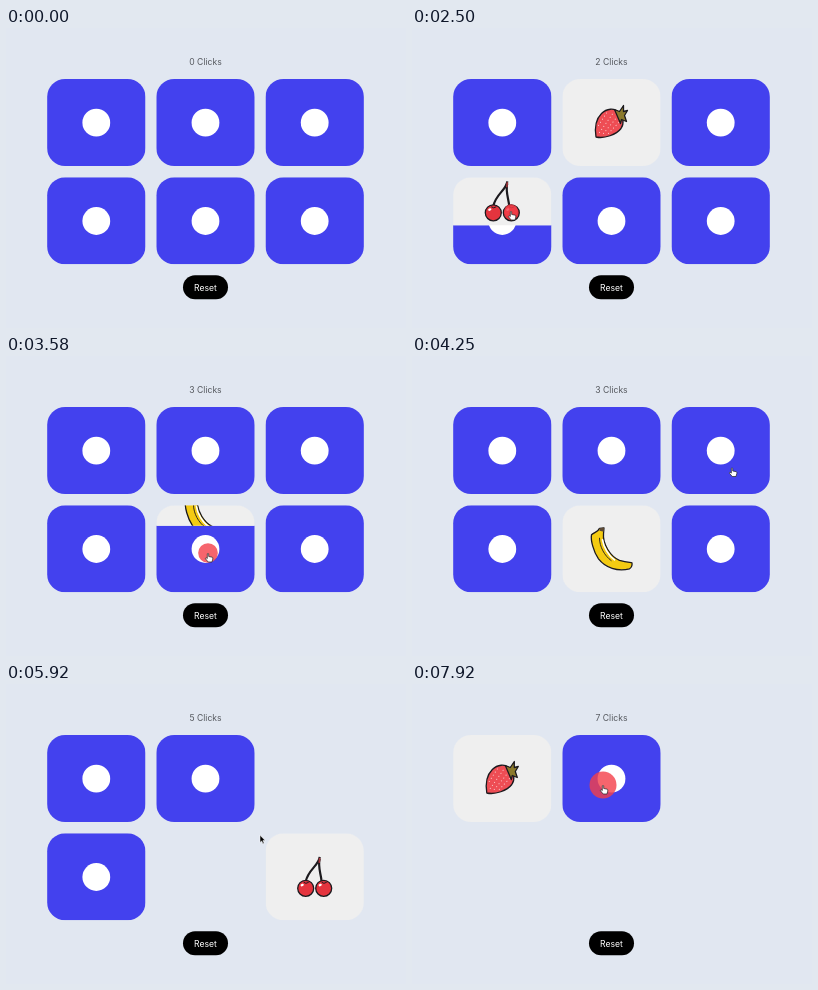
An HTML page that plays this animation: 400 by 300 pixels, repeating every 8 s.

```html
<!DOCTYPE html>
<html lang="en">
<head>
<meta charset="utf-8">
<title>Memory game</title>
<style>
  html, body { margin: 0; width: 100%; height: 100%; overflow: hidden; background: #e1e7f1; }
  #stage { display: block; width: 400px; height: 300px; }
  text { font: 8.6px Inter, "Liberation Sans", sans-serif; text-anchor: middle; }
  .line { stroke: #1c1a1e; stroke-width: 1.3; stroke-linejoin: round; }
  .ink { fill: none; stroke: #1c1a1e; }
  .shine { fill: none; stroke: #fff; stroke-linecap: round; }
</style>
</head>
<body>
<svg id="stage" viewBox="0 0 400 300">
  <defs>
    <g id="strawberry">
      <path class="line" fill="#ee4d54" d="M-15.5 14.5C-17 5-15-4-10-9C-5-14 3-15 7-10C12-6 13 1 9.5 6C5 12-7 16.5-15.5 14.5Z"/>
      <path class="shine" stroke-width="1.1" stroke-opacity=".65" stroke-dasharray=".1 3.6" d="M-12 10L2-10M-8 11L6-6M-3 11L9-2M-13 3L-4-11"/>
      <path class="line" fill="#8b7a2c" d="M3-13L8-11L12-17L12-11L16-12L13-7L15-1L10-3L9 1L6-6Z"/>
    </g>
    <g id="banana">
      <path class="line" fill="#f4cb12" d="M-12-20.5L-7.5-21L-8-15C-9-5-1 8 8 11.5C13 13 17 13.5 20.5 14Q21 18 18 20C6 23-6 19-13 10C-18 3-21-9-20-14C-17-17-13.5-16.5-12-20.5Z"/>
      <path class="shine" stroke-width="1.6" d="M-9-9C-8-2-3 7 3 11"/>
      <path class="ink" stroke-width=".9" d="M-12-11C-12-2-7 7 0 12"/>
      <path fill="#5d4a35" d="M-12-20.5L-7.5-21L-7.8-17L-12-18Z"/>
    </g>
    <g id="cherry">
      <path class="ink" stroke-width="2.2" d="M5-20C4-11-7-7-9 5M5-18C3-10 6-4 7 5"/>
      <path stroke="#a5343a" stroke-width="1.6" d="M5-19L4.5-14"/>
      <g id="berry">
        <circle class="line" cx="-9" cy="11.5" r="8" fill="#e4343e"/>
        <path class="shine" stroke-width="2.2" d="M-13 8.5L-12 8"/>
        <path class="ink" d="M-11 5.5Q-9 7.5-6 5.5"/>
      </g>
      <use href="#berry" x="18"/>
    </g>
    <clipPath id="round"><rect width="98.4" height="87" rx="18"/></clipPath>
  </defs>
  <text id="count" x="199.5" y="37" fill="#55585e"></text>
  <g id="cards"></g>
  <rect x="177" y="247.2" width="45" height="24" rx="12"/>
  <text x="199.5" y="262.5" fill="#fff">Reset</text>
  <circle id="pulse" fill="#f43f48" fill-opacity=".8"/>
  <g id="cursor" stroke-linejoin="round">
    <path id="arrow" stroke="#fff" stroke-width=".5" d="M0 0V7.2L1.7 5.7L2.9 8.4L4.1 7.9L2.9 5.2H5.1Z"/>
    <path id="hand" fill="#fff" stroke="#222" stroke-width=".7" d="M-.7.8Q0-.4.7.8V3.5L4.3 4.2Q5 4.5 4.8 6L4 9H.2L-2.6 5.7Q-2.6 4.5-1.4 5L-.7 5.6Z"/>
  </g>
</svg>
<script>
const LOOP = 8000, STEP = 1000 / 12, W = 98.4, H = 87;
const ENTER = 1160, TRAVEL = 400, HOLD = 120, RELEASE = 160, FLIP = 250, PEEK = 500;
const $ = id => document.getElementById(id);
const clamp = v => Math.min(1, Math.max(0, v));
const smooth = v => v * v * (3 - 2 * v);
const show = (el, on) => el.setAttribute('visibility', on ? 'visible' : 'hidden');

// leave: cursor sets off; up: button released; bow: bend of the way there
const clicks = [
  { card: 1, leave: ENTER, up: 1691, x: 215, y: 52 },
  { card: 3, leave: 1830, up: 2420, x: 99, y: 183 },
  { card: 4, leave: 3030, up: 3540, x: 202, y: 197 },
  { card: 2, leave: 3915, up: 4480, x: 329, y: 105 },
  { card: 5, leave: 4900, up: 5500, x: 308, y: 188 },
  { card: 3, leave: 5784, up: 6817, x: 98, y: 180, bow: -48 },
  { card: 0, leave: 7000, up: 7520, x: 97, y: 103 },
  { card: 1, leave: 7500, up: 8020, x: 191, y: 101 }
];

const cards = ['strawberry', 'strawberry', 'banana', 'cherry', 'banana', 'cherry'].map((fruit, i) => {
  const x = 41.1 + (i % 3) * 109.2, y = i < 3 ? 51 : 149.3;
  $('cards').insertAdjacentHTML('beforeend', `
    <g transform="translate(${x} ${y})" clip-path="url(#round)">
      <rect width="${W}" fill="#4341ee"/>
      <circle cx="${W / 2}" cy="43.7" r="13.9" fill="#fff"/>
      <svg width="${W}" overflow="hidden">
        <rect width="${W}" height="${H}" fill="#efefef"/>
        <use href="#${fruit}"/>
      </svg>
    </g>`);
  const el = $('cards').lastElementChild;
  return { fruit, x, y, el, cover: el.querySelector('rect'), face: el.querySelector('svg'),
           image: el.querySelector('use'), flips: [], gone: LOOP };
});

// play the game once: a pair vanishes at once, a mismatch turns back after a peek
let first = null;
for (const { card, up } of clicks) {
  const c = cards[card];
  c.flips.push({ at: up, to: 1 });
  if (!first) { first = c; continue; }
  for (const it of [first, c]) {
    if (first.fruit === c.fruit) it.gone = up;
    else it.flips.push({ at: up + PEEK, to: 0 });
  }
  first = null;
}

// cubic-bezier(.25, .1, .25, 1)
function ease(x) {
  let s = .5;
  for (let d = .25; d > 1e-6; d /= 2) s += .75 * s * (1 - s) + s ** 3 < x ? d : -d;
  return .3 * s * (1 - s) ** 2 + 3 * s * s * (1 - s) + s ** 3;
}

function openness(card, t) {
  let v = 0;
  for (const { at, to } of card.flips) if (t >= at) v += (to - v) * ease(clamp((t - at) / FLIP));
  return v;
}

function cursorAt(t) {
  let x = 213, y = 226;
  for (const c of clicks) {
    const k = smooth(clamp((t - c.leave) / TRAVEL));
    x += (c.x - x) * k;
    y += (c.y - y) * k + (c.bow || 0) * Math.sin(Math.PI * k);
  }
  return [x, y];
}

function pulseSize(t) {
  const c = clicks.find(c => t >= c.up - HOLD && t < c.up + RELEASE);
  return c ? 13.5 * (1 - clamp((t - c.up) / RELEASE)) : 0;
}

function draw(t) {
  const [x, y] = cursorAt(t);
  let over = false;
  for (const c of cards) {
    const h = H * openness(c, t), live = t < c.gone;
    show(c.el, live);
    c.cover.setAttribute('y', h);
    c.cover.setAttribute('height', H - h);
    c.face.setAttribute('height', h);
    c.face.style.display = h > .05 ? '' : 'none';
    c.image.setAttribute('transform', `translate(${W / 2} ${h / 2})`);
    over ||= live && x > c.x && x < c.x + W && y > c.y && y < c.y + H;
  }
  $('count').textContent = clicks.filter(c => t >= c.up).length + ' Clicks';
  $('pulse').setAttribute('cx', x);
  $('pulse').setAttribute('cy', y);
  $('pulse').setAttribute('r', pulseSize(t));
  $('cursor').setAttribute('transform', `translate(${x} ${y})`);
  show($('hand'), t >= ENTER && over);
  show($('arrow'), t >= ENTER && !over);
}

// twelve steps per second
const start = performance.now();
function tick() {
  const t = (performance.now() - start) % LOOP;
  draw(Math.floor((t + 4) / STEP) % 96 * STEP);
  requestAnimationFrame(tick);
}
tick();
</script>
</body>
</html>
```
